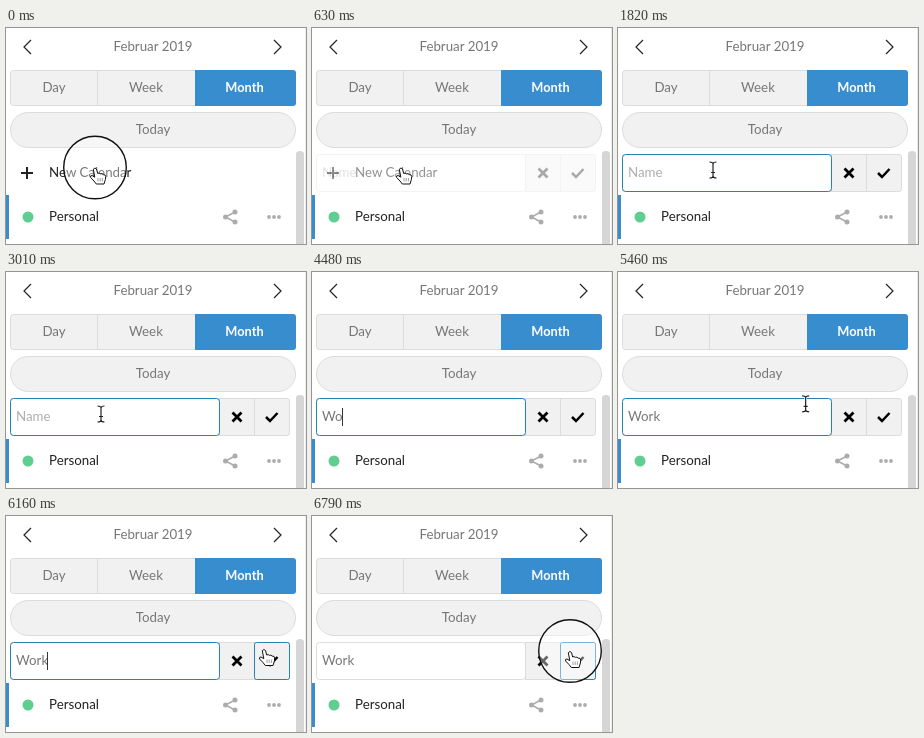
These frames come from a looping animation (300x216 px, 6.86 s). An HTML page:

```html
<!DOCTYPE html>
<html lang="en">
<head>
<meta charset="utf-8">
<title>New calendar</title>
<style>
  html, body { margin: 0; width: 100%; height: 100%; overflow: hidden; background: #fff; }
  svg { display: block; width: 100%; height: 100%; }
  text { font: 13.3px Lato, "Open Sans", sans-serif; fill: #222; }
  .mid { text-anchor: middle; fill: #767676; }
  .line { fill: none; stroke: #222; }
  .box { fill: #f1f1f1; stroke: #dcdcdc; }
  .focus { fill: none; stroke: #2583b5; }
  .soft { fill: #acacac; }
  .halo { fill: none; stroke: #fff; stroke-width: 2.6; }
</style>
</head>
<body>
<svg viewBox="0 0 300 216">
  <defs>
    <path id="beamPath" d="M-3.5-8Q0-8 0-6Q0-8 3.5-8M0-6V6M-3.5 8Q0 8 0 6Q0 8 3.5 8M-2 2.5H2"/>
  </defs>

  <!-- header -->
  <path class="line" stroke-width="1.2" d="M25 12L18 19L25 26M268 12L275 19L268 26"/>
  <text class="mid" x="147" y="23">Februar 2019</text>

  <!-- view switch -->
  <rect class="box" x="4.5" y="42.5" width="285" height="35" rx="3"/>
  <path d="M91.5 42V78" stroke="#dcdcdc"/>
  <path d="M189 42H287Q290 42 290 45V75Q290 78 287 78H189Z" fill="#388dcf"/>
  <text class="mid" x="48" y="64">Day</text>
  <text class="mid" x="140" y="64">Week</text>
  <text class="mid" x="238.5" y="64" style="fill:#fff;font-weight:bold;font-size:12.8px">Month</text>
  <rect class="box" x="4.5" y="84.5" width="285" height="35" rx="17.5"/>
  <text class="mid" x="147" y="106">Today</text>

  <!-- calendar list -->
  <rect y="167" width="3" height="44" fill="#388dcf"/>
  <circle cx="22" cy="189" r="5.5" fill="#60cd91"/>
  <text x="43" y="193">Personal</text>
  <g class="soft">
    <path class="line" style="stroke:#acacac" stroke-width="1.6" d="M229 184L219.500 189L229 194"/>
    <circle cx="219.500" cy="189" r="2.5"/>
    <circle cx="229" cy="184" r="2.5"/>
    <circle cx="229" cy="194" r="2.5"/>
    <circle cx="263" cy="189" r="1.9"/>
    <circle cx="268" cy="189" r="1.9"/>
    <circle cx="273" cy="189" r="1.9"/>
  </g>
  <path d="M290 216V126Q290 123 294 123Q298 123 298 126V216Z" fill="#d6d6d6"/>
  <path d="M299.500 0V216" stroke="#ececec"/>

  <g id="addRow">
    <path class="line" stroke="#000" stroke-width="2" d="M15 145H27M21 139V151"/>
    <text x="43" y="149">New Calendar</text>
  </g>

  <g id="form">
    <rect x="4.5" y="126.500" width="209" height="37" rx="3" fill="#fff" stroke="#dcdcdc"/>
    <rect class="box" x="213.500" y="126.500" width="35" height="37"/>
    <path class="box" d="M248.500 126.500H281Q283.500 126.500 283.500 129V161Q283.500 163.500 281 163.500H248.500Z"/>
    <path class="line" style="stroke:#000" stroke-width="2.8" d="M226.500 140.500L235.500 149.500M235.500 140.500L226.500 149.500"/>
    <path class="line" style="stroke:#000" stroke-width="2.5" d="M260 145L264 149L271.500 141"/>
    <text id="field" x="10" y="149"></text>
  </g>
  <rect id="inputFocus" class="focus" x="4.5" y="126.500" width="209" height="37" rx="3"/>
  <rect id="okFocus" class="focus" x="248.500" y="126.500" width="35" height="37" rx="2"/>
  <rect id="caret" y="136" width="1" height="18" fill="#333"/>

  <circle id="ring" fill="#fff" fill-opacity=".4" stroke="#111" stroke-width="1.4"/>
  <g id="beam">
    <use href="#beamPath" class="halo"/>
    <use href="#beamPath" class="line" stroke-width="1.2"/>
  </g>
  <path id="arrow" d="M0 0V14L3.400 11L5.800 16.300L8 15.300L5.700 10.200H10.200Z" fill="#111" stroke="#fff"/>
  <g id="hand" stroke="#111" stroke-linejoin="round">
    <path fill="#fff" d="M-1.700 1.700Q0-.6 1.500 1.500L2.700 6Q4.200 4.900 5.300 6.400Q7.200 5.500 8.100 7.100Q10.600 6.700 10.700 9L10.400 12L9 16.500H1.300L-1 13.500L-4.400 10Q-5 7.800-3 8L-.2 9.700Z"/>
    <path stroke="#888" stroke-width=".8" d="M3 10.500V14M5.200 10.500V14M7.400 10.500V14"/>
  </g>
</svg>
<script>
const LOOP = 6860, STEP = 70;
const $ = id => document.getElementById(id);
const clamp = v => Math.max(0, Math.min(1, v));
const ramp = (t, from, to) => clamp((t - from) / (to - from));
const mix = (a, b, p) => a + (b - a) * p;
const within = (t, from, to) => t >= from && t < to;
const show = (id, on) => $(id).setAttribute('visibility', on ? 'visible' : 'hidden');
const fade = (id, v) => $(id).setAttribute('opacity', v);

// [time, x, y, radius, end]
const clicks = [
  [0, 89, 139.5, 31.3, 420],
  [2450, 95, 141.5, 17, 2660],
  [6720, 258, 135, 31.3, LOOP]
];
const keyTimes = [4340, 4480, 4620, 4690];

function pointer(t) {
  if (t < 840) return ['hand', 89, 139.5];
  if (t < 4340) {
    const p = ramp(t, 1400, 1610);
    return ['beam', mix(89, 95, p), t < 1820 ? mix(139.5, 141, p) : 142];
  }
  if (t < 5180) return ['none', 0, 0];
  if (t < 6020) {
    const p = 1 - (1 - ramp(t, 5110, 5810)) ** 1.3;
    const x = mix(95, 251, p) + (t >= 5880 ? 1 : 0);
    const y = mix(142, 123, p ** 1.2);
    return [x < 214 ? 'beam' : y < 126 ? 'arrow' : 'hand', x, y];
  }
  const p = ramp(t, 5950, 6160);
  return ['hand', mix(252, 258, p), t < 6510 ? mix(123, 133, p) : 135];
}

function caretOn(t) {
  if (t < 2450 || t >= 6720) return false;
  if (t < 4340) return t < 3010 || within(t, 3500, 4060);
  return t < 4690 || Math.floor((t - 4690) / 530) % 2 === 0;
}

function draw(t) {
  const open = ramp(t, 525, 840);
  fade('addRow', 1 - open ** 1.2);
  fade('form', open);

  const typed = 'Work'.slice(0, keyTimes.filter(k => t >= k).length);
  const field = $('field');
  field.textContent = typed || 'Name';
  field.style.fill = typed ? '#767676' : '#adadad';
  $('caret').setAttribute('x', 10 + (typed ? Math.round(field.getComputedTextLength()) - 1 : 0));
  show('caret', caretOn(t));

  fade('inputFocus', ramp(t, 1435, 1610) * (1 - ramp(t, 6650, 6790)));
  fade('okFocus', ramp(t, 5950, 6160));

  const click = clicks.find(c => within(t, c[0], c[4]));
  show('ring', click);
  if (click) ['cx', 'cy', 'r'].forEach((a, i) => $('ring').setAttribute(a, click[i + 1]));

  const [kind, x, y] = pointer(t);
  for (const id of ['hand', 'beam', 'arrow']) {
    show(id, id === kind);
    $(id).setAttribute('transform', `translate(${x} ${y})`);
  }
}

const start = performance.now();
function tick() {
  const t = (performance.now() - start) % LOOP;
  draw(Math.floor(t / STEP) * STEP);
  requestAnimationFrame(tick);
}
tick();
</script>
</body>
</html>
```
